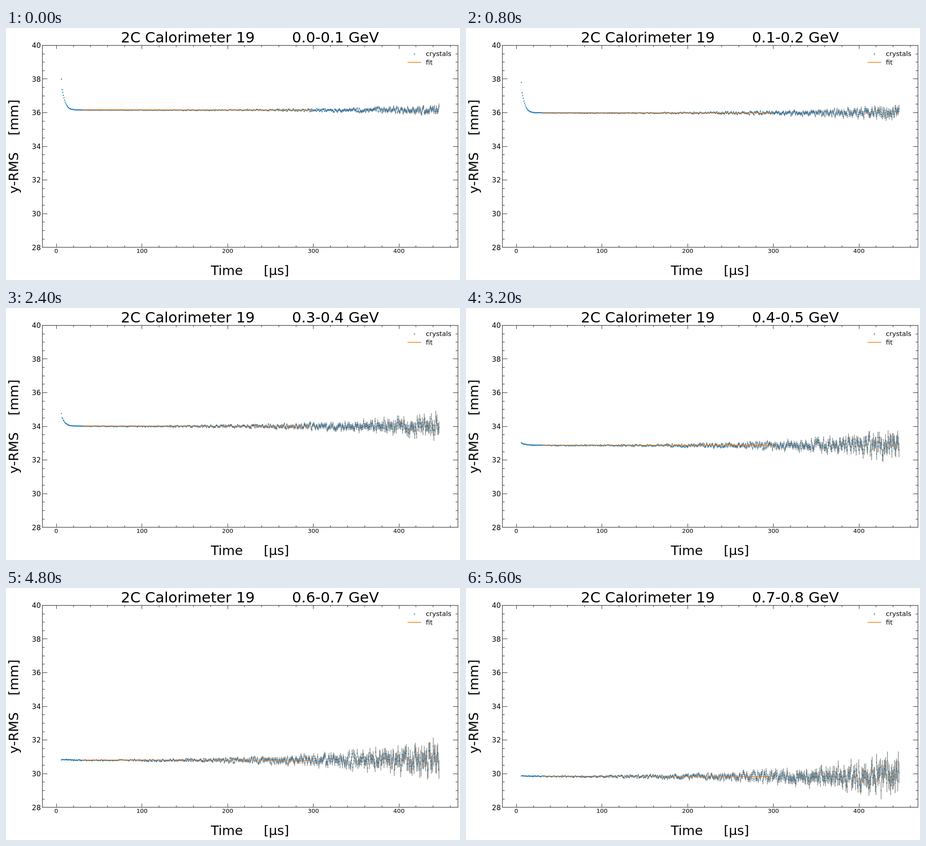
An HTML page with a canvas for the animation above (6.4 s loop, 1004 by 558 pixels).

```html
<!DOCTYPE html>
<html lang="en">
<head>
<meta charset="utf-8">
<title>y-RMS over time by energy</title>
<style>
html, body { margin: 0; width: 100%; height: 100%; overflow: hidden; background: #fff; }
canvas { display: block; }
</style>
</head>
<body>
<canvas id="plot" width="1004" height="558"></canvas>
<script>
const ctx = document.getElementById('plot').getContext('2d');
const LEFT = 80.5, RIGHT = 999.5, TOP = 38.5, BOTTOM = 485.5;
const BLUE = '#1f77b4', ORANGE = '#ff7f0e', GREY = '#888884', INK = '#111';
const HOLD = 800, START = 6, STEP = 0.7457, COUNT = 592;
const X_UNIT = 1.8945, Y_UNIT = 37.28;

// fitted mean of each energy bin, in mm
const levels = [36.17, 36, 35.14, 34.02, 32.88, 31.82, 30.81, 29.85];

const px = t => 111.2 + t * X_UNIT;
const py = v => TOP + (40 - v) * Y_UNIT;

function random(seed) {
  return () => {
    seed = (seed + 0x6D2B79F5) | 0;
    let r = Math.imul(seed ^ (seed >>> 15), 1 | seed);
    r = (r + Math.imul(r ^ (r >>> 7), 61 | r)) ^ r;
    return ((r ^ (r >>> 14)) >>> 0) / 4294967296;
  };
}

// Early excess that decays, then scatter and error bars that grow as counts fall.
function makePoints(level, k) {
  const rnd = random(k * 97 + 5);
  const sigma = 0.16 + 0.065 * k;
  const rise = 1.3 / (1 + Math.exp((k - 2.8) * 2.2));
  return Array.from({ length: COUNT }, (_, i) => {
    const age = i * STEP, t = START + age;
    const err = sigma * Math.exp((t - 447) / 128);
    const normal = (rnd() + rnd() + rnd() + rnd() - 2) * 1.73;
    const noise = 0.8 * Math.max(-2.1, Math.min(2.1, normal));
    const excess = rise * Math.exp(-Math.pow(age / 4.2, 1.3)) + 0.05 * Math.exp(-age / 15);
    const first = i ? 0 : rise * 0.38;
    return { x: px(t), y: py(level - 0.015 + excess + first + noise * err), bar: err * Y_UNIT };
  });
}
const series = levels.map(makePoints);

function text(s, x, y, size, align = 'center') {
  ctx.font = size + 'px "DejaVu Sans", sans-serif';
  ctx.textAlign = align;
  ctx.fillStyle = '#000';
  ctx.fillText(s, x, y);
}

function line(x1, y1, x2, y2, color, width) {
  ctx.strokeStyle = color;
  ctx.lineWidth = width;
  ctx.beginPath();
  ctx.moveTo(x1, y1);
  ctx.lineTo(x2, y2);
  ctx.stroke();
}

function dot(x, y) {
  ctx.fillStyle = BLUE;
  ctx.beginPath();
  ctx.arc(x, y, 1.25, 0, 7);
  ctx.fill();
}

function drawAxes() {
  ctx.strokeStyle = INK;
  ctx.lineWidth = 1;
  ctx.strokeRect(LEFT, TOP, RIGHT - LEFT, BOTTOM - TOP);
  for (let t = 0; t <= 460; t += 20) {
    const major = t % 100 === 0, len = major ? 8 : 4, x = Math.floor(px(t)) + 0.5;
    line(x, TOP, x, TOP + len, INK, 0.9);
    line(x, BOTTOM, x, BOTTOM - len, INK, 0.9);
    if (major) text(t, px(t), 498, 13);
  }
  for (let v = 28; v <= 40; v += 0.5) {
    const major = v % 2 === 0, len = major ? 11 : 5, y = Math.floor(py(v) - 0.1) + 0.5;
    line(LEFT, y, LEFT + len, y, INK, 0.9);
    line(RIGHT, y, RIGHT - len, y, INK, 0.9);
    if (major) text(v, 77, py(v) + 5.7, 15.5, 'right');
  }
  text('Time     [µs]', 539.5, 547, 29);
  ctx.save();
  ctx.translate(27, 262.5);
  ctx.rotate(-Math.PI / 2);
  text('y-RMS    [mm]', 0, 0, 29.2);
  ctx.restore();
}

function drawLegend() {
  dot(903.3, 57.5);
  text('crystals', 928.5, 62, 14.5, 'left');
  line(888, 76, 918, 76, ORANGE, 1.6);
  text('fit', 928.5, 81.3, 14.5, 'left');
}

function draw(k) {
  const points = series[k], fit = py(levels[k]) - 0.3;
  ctx.fillStyle = '#fff';
  ctx.fillRect(0, 0, 1004, 558);
  drawAxes();
  text(`2C Calorimeter 19        0.${k}-0.${k + 1} GeV`, 539.4, 32, 32.4);
  for (const p of points) line(p.x, p.y - p.bar, p.x, p.y + p.bar, GREY, 1.5);
  for (const p of points) dot(p.x, p.y);
  line(px(30), fit, px(300), fit + 0.8, ORANGE, 1.4);
  drawLegend();
}

let shown = -1;
function tick(now) {
  const k = Math.floor(now / HOLD) % levels.length;
  if (k !== shown) draw(shown = k);
  requestAnimationFrame(tick);
}
draw(shown = 0);
requestAnimationFrame(tick);
</script>
</body>
</html>
```
